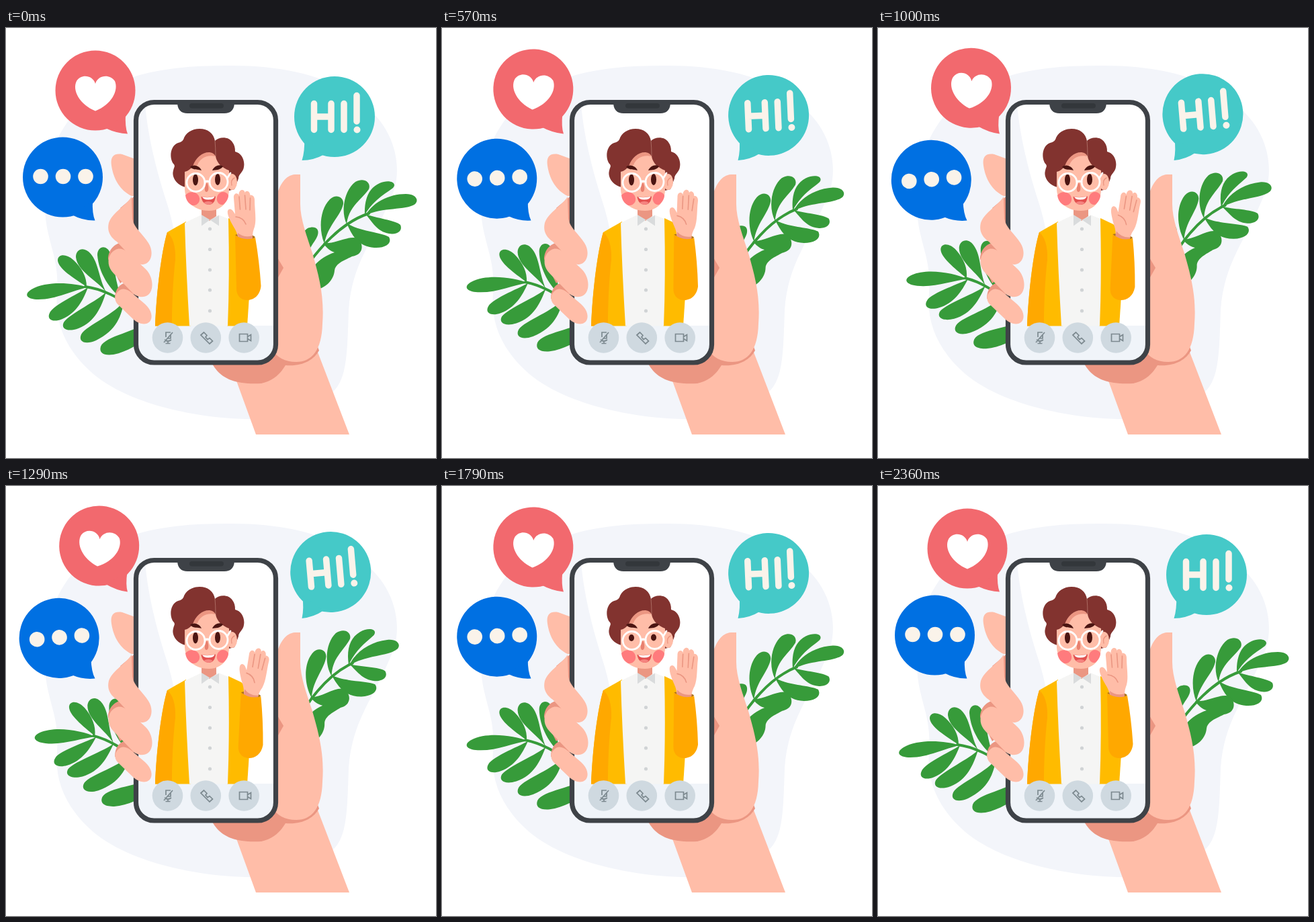
Animation, 640 px wide and 640 px high, one loop 2430 ms. Source, as an HTML page:

```html
<!DOCTYPE html>
<html lang="en">
<head>
<meta charset="utf-8">
<title>Video call</title>
<style>
html, body { margin: 0; height: 100%; overflow: hidden; background: #fff; }
svg { display: block; width: 100vw; height: 100vh; }
.skin { fill: #ffbda8; }
.shade { fill: #eb9682; }
.cream { fill: #faf3ea; }
.line { fill: none; stroke-linecap: round; stroke-linejoin: round; }
.plant { fill: #379b3a; }
.plant .line { stroke: #379b3a; stroke-width: 4; fill: none; }
.icon { fill: none; stroke: #7c898f; stroke-width: 1.7; }
</style>
</head>
<body>
<svg viewBox="0 0 640 640">
  <path fill="#f3f5fa" d="M330 56C420 55 500 75 545 125C585 165 590 220 572 255C545 320 515 350 510 420C508 480 508 520 488 540C460 570 420 582 362 582C300 582 190 565 130 515C90 480 72 440 76 395C80 340 60 320 58 270C56 190 80 140 130 100C190 62 260 56 330 56Z"/>

  <g id="heart" fill="#f2696e">
    <circle cx="133" cy="93" r="59.5"/>
    <path d="M178 128Q177 148 181 157.500Q165 157 148 149Z"/>
    <path fill="#fff" d="M133 83C129 70 112 68 105 79C98 93 110 114 133 123.500C157 114 168 93 162 79C154 68 137 70 133 83Z"/>
  </g>
  <g id="dots" fill="#0070e2">
    <circle cx="84.500" cy="222" r="59.500"/>
    <path d="M129 257Q128 276 132.500 286.500Q115 287 98 278Z"/>
    <g class="cream"><circle cx="51.500" cy="221" r="11.300"/><circle cx="85" cy="221" r="11.300"/><circle cx="118.500" cy="221" r="11.300"/></g>
  </g>
  <g id="hi" fill="#45c9c8">
    <circle cx="489" cy="132" r="60"/>
    <path d="M444 163Q445 183 440.500 197Q458 197 474 188Z"/>
    <path class="line" stroke="#faf3ea" stroke-width="9.500" d="M458.500 112.500V151.500M484 112.500V151.500M458.500 132H484M503 112.500V151.500M522 100.500V139"/>
    <circle class="cream" cx="522.500" cy="151.500" r="5"/>
  </g>

  <g id="leftPlant" class="plant">
    <path class="line" d="M118 385C142 388 160 398 200 420"/>
    <path d="M122 386C100 379 60 376 38 389C25 397 32 404 48 404C75 404 100 390 122 386Z"/>
    <path d="M120 385C100 372 78 358 77 346C77 336 90 336 100 345C113 357 120 370 120 385Z"/>
    <path d="M149 393C135 375 106 362 104 341C104 328 117 325 126 336C138 350 138 372 149 393Z"/>
    <path d="M172 402C155 390 138 365 136 338C136 324 150 322 155 335C162 355 163 380 172 402Z"/>
    <path d="M122 386C115 392 70 412 65 424C60 434 70 439 84 433C105 424 115 405 122 386Z"/>
    <path d="M149 393C138 405 95 425 86 438C81 448 92 453 108 447C133 437 142 415 149 393Z"/>
    <path d="M176 405C165 425 120 442 112 456C107 467 118 472 134 465C165 450 172 428 176 405Z"/>
    <path d="M215 435C195 452 148 458 141 474C138 484 146 488 160 486C180 482 200 470 215 455Z"/>
  </g>
  <g id="rightPlant" class="plant">
    <path class="line" d="M436 370C466 327 498 290 540 276"/>
    <path d="M535 279C545 260 570 247 595 247C610 247 615 256 609 262C595 272 560 266 535 279Z"/>
    <path d="M534 278C533 255 540 238 556 231C570 225 583 230 576 238C563 248 548 255 534 278Z"/>
    <path d="M507 292C497 270 505 240 520 229C533 222 544 230 540 240C530 255 510 265 507 292Z"/>
    <path d="M474 321C465 300 467 270 482 255C492 246 503 252 502 262C498 280 478 295 474 321Z"/>
    <path d="M446 348C432 325 438 305 449 298C459 294 467 298 464 308C460 320 450 325 446 348Z"/>
    <path d="M535 277C550 283 580 286 587 293C591 302 582 308 570 306C552 303 545 288 535 277Z"/>
    <path d="M507 290C522 302 558 304 570 311C575 320 566 328 548 327C525 325 515 310 507 290Z"/>
    <path d="M472 320C490 322 510 308 524 313C533 322 532 338 515 340C505 345 490 350 489 361C488 375 476 386 464 389L440 385C450 360 465 342 489 334C482 332 476 326 472 320Z"/>
  </g>

  <!-- arm and back of the holding hand -->
  <path class="skin" d="M340 517L372 605H511L463 480L400 470Z"/>
  <path class="shade" d="M307 500C320 523 343 531 380 529C398 525 408 515 416 502C442 504 458 494 466 480L400 300H390L300 480Z"/>
  <path class="skin" d="M400 260C406 233 416 219 430 218H438V262C438 285 448 310 456 335C466 370 474 400 471 440C470 480 455 497 432 497C415 497 403 490 398 480Z"/>
  <path class="shade" d="M400 335L413 357L400 380Z"/>
  <path class="skin" d="M195 196L173 188C160 186 155 192 157 205C160 225 170 242 187 250H195Z"/>
  <path class="shade" d="M195 247L170 268L195 300ZM152 344C152 330 163 318 176 320L205 350L170 380ZM162 403C162 388 170 380 180 379L205 400Z"/>

  <!-- phone -->
  <rect x="193.500" y="110.500" width="208" height="387.500" rx="27" fill="#fff"/>
  <path fill="#f3f5fa" d="M207 114C212 170 228 225 240 262C252 300 262 360 262 443H197V138C197 125 201 118 207 114Z"/>
  <path fill="#f0f4f9" d="M195 443H400V470Q398 496 374 496H222Q197 496 195 470Z"/>

  <!-- caller -->
  <path fill="#ffbb00" d="M331 283L350 292Q364 303 367 325L359 443.500H329Z"/>
  <path fill="#ffbb00" d="M222 443.500C224 390 232 330 240 304L268 288L275 443.500Z"/>
  <path fill="#ffa800" d="M222 443.500C224 390 232 330 240 304C248 310 253 325 252 345C248 380 247 420 247 443.500Z"/>
  <path fill="#f5f5f4" d="M266 290L291 278L303 285L316 278L331 284Q333 370 330 443.500H273Q268 360 266 290Z"/>
  <g fill="#d0d3d5"><circle cx="303.500" cy="299" r="2.600"/><circle cx="303.500" cy="329.500" r="2.600"/><circle cx="303.500" cy="360" r="2.600"/><circle cx="303.500" cy="390" r="2.600"/><circle cx="303.500" cy="421" r="2.600"/></g>
  <path class="shade" d="M291 262H313V280L303 287L291 280Z"/>
  <path fill="#d9dbdc" d="M291 278V294.500L303.500 285.500L317 294.500V279L303.500 285.500Z"/>

  <path fill="#82332f" d="M267 237C254 234 246 222 249 212C250 207 252 206 250 203C243 196 243 176 256 171C260 170 262 169 264 166C267 156 277 150 288 150C301 150 309 157 311 168C317 162 331 161 337 170C340 174 341 178 341 184C350 186 356 196 354 207C353 215 346 217 346 224L340 240L300 250Z"/>
  <path class="line" stroke="#b5796f" stroke-width=".8" d="M311 168Q312 178 312 191"/>
  <ellipse class="skin" cx="336.500" cy="229" rx="7.500" ry="12"/>
  <path class="line" stroke="#eb9682" stroke-width="1.400" d="M340 223Q334 226 336 234"/>
  <path class="skin" d="M266 214C276 212 279 203 284 196C291 185 304 184 312 191C314 202 322 208 332 212V240C332 262 318 272 302 272C283 272 267 262 266 240Z"/>
  <path class="shade" d="M278 206C282 193 292 185 302 185C306 185 310 187 312 191C298 188 288 195 285 204Z"/>
  <g fill="#ff7b7d"><path d="M267 249C272 242 283 243 287 250C291 259 284 265 277 264C271 261 268 256 267 249Z"/><path d="M331 249C328 243 319 242 315 249C311 257 317 264 323 263C328 259 331 254 331 249Z"/></g>
  <g fill="#4b1512">
    <path d="M274 207C279 202 288 205 291 212C286 210 279 212 274 207Z"/>
    <path d="M323 206C318 202 310 205 307 212C312 211 319 212 323 206Z"/>
    <ellipse class="eye" cx="282" cy="226" rx="4"/>
    <ellipse class="eye" cx="315" cy="225.500" rx="4"/>
  </g>
  <path fill="#e8806f" d="M298 231C295 238 295 244 298.500 244C302 243 302 237 300 231Z"/>
  <g class="line" stroke="#fff" stroke-width="2.800"><circle cx="282.500" cy="230" r="13.500"/><circle cx="316.500" cy="229" r="13.500"/><path d="M296 229Q299 227 303 229M329 224L334 216"/></g>
  <path fill="#e2504f" d="M290.500 251Q301 253 312 250.500Q311 263 301 263Q292 262 290.500 251Z"/>
  <path fill="#fff" d="M292 251.500Q301 253 310.500 251Q309 255.500 301 255.500Q294 255.500 292 251.500Z"/>
  <path fill="#f58480" d="M294 260Q301 256 308 260Q305 263 301 263Q297 263 294 260Z"/>

  <g id="forearm">
    <path fill="#a8701c" d="M341 308Q357 302 371 311L366 316H346Z"/>
    <g id="palm">
      <path class="skin" d="M346 318C345 303 340 299 336 291C332 283 329 277 330 272C332 268 336 269 339 274L341 277L339 253C338 246 345 244 346.500 249C346 239 355 239 355.500 245C357 241 363 242 363.500 249C366 248 370 250 370 256C370 270 373 285 370 296C367 304 367 306 367 318Z"/>
      <path class="line" stroke="#eb9682" stroke-width="1.600" d="M347 251L348.500 270M355.500 249L357 270M363.500 253L363 271M342 281Q353 282 357 292"/>
      <path class="shade" d="M345 305Q355 313 367 309V318H346Z"/>
    </g>
    <path fill="#ffa800" d="M341 308Q355 318 371 312C375 335 378 360 379.500 384C378 399 368 405 359 405C349 405 343 398 343 388Z"/>
  </g>

  <!-- call controls -->
  <g fill="#cfd9e0"><circle cx="240.500" cy="461" r="22.800"/><circle cx="297.300" cy="461" r="22.800"/><circle cx="354.200" cy="461" r="22.800"/></g>
  <g class="icon">
    <path d="M238 460V453H245M245 457V462H240M236 464Q241 468 246 464M241 466V469.500M237.500 469.500H244.500M235 468L248 453"/>
    <path d="M290 457L294.500 453L299 457.500L297 460L300 463.500L303 461.500L307.500 466L303 470Z"/>
    <path d="M347.500 455.500H359.500V466.500H347.500ZM359.500 459.500L364.500 456.500V465.500L359.500 462.500"/>
  </g>

  <rect x="193.500" y="110.500" width="208" height="387.500" rx="27" fill="none" stroke="#3e4247" stroke-width="7.200"/>
  <path fill="#3e4247" d="M255 110H340V112Q339 127 325 127H270Q256 127 255 112Z"/>
  <rect x="273" y="112" width="51" height="7.500" rx="3.700" fill="#33373b"/>

  <!-- fingers in front -->
  <g class="skin">
    <path d="M187 251C178 265 158 275 153 290C150 302 155 311 165 318L191 346C196 351 200 352 204 352C216 351 221 334 212 320C204 307 190 297 188 284Z"/>
    <path d="M156 336C163 327 172 326 180 333L207 358C218 368 220 385 215 393C210 402 198 402 190 396L160 365C152 357 150 345 156 336Z"/>
    <path d="M166 393C172 386 180 388 187 394L207 411C217 420 219 431 214 437C208 443 198 441 190 434L167 412C161 406 161 398 166 393Z"/>
  </g>
</svg>
<script>
const FPS = 14, LOOP = 2430, LAST = 33;
const eyes = document.querySelectorAll('.eye');

// id: [degrees at full swing, pivot x, pivot y]
const swings = {
  heart: [5, 181, 157],
  dots: [-5, 132.5, 286.5],
  hi: [-5, 440, 197],
  leftPlant: [6.4, 243, 490],
  rightPlant: [-6.2, 412, 496],
  forearm: [4.3, 360, 425],
  palm: [9.7, 357, 311]
};
const parts = Object.entries(swings).map(([id, swing]) => [document.getElementById(id), swing]);

const ease = t => t * t * (3 - 2 * t);

function eyeOpen(step) {
  const gap = Math.min(Math.abs(step - 4), Math.abs(step - 24));
  return Math.min(1, 0.28 + 0.3 * gap);
}

function draw(now) {
  const step = Math.min(LAST, Math.floor((now % LOOP + 5) * FPS / 1000));
  const pose = ease(Math.min(step, LAST - step) / 16);
  for (const [el, [deg, x, y]] of parts)
    el.setAttribute('transform', `rotate(${deg * pose} ${x} ${y})`);
  for (const eye of eyes) eye.setAttribute('ry', 8.5 * eyeOpen(step));
}

const start = performance.now();
function tick() {
  draw(performance.now() - start);
  requestAnimationFrame(tick);
}
tick();
</script>
</body>
</html>
```
